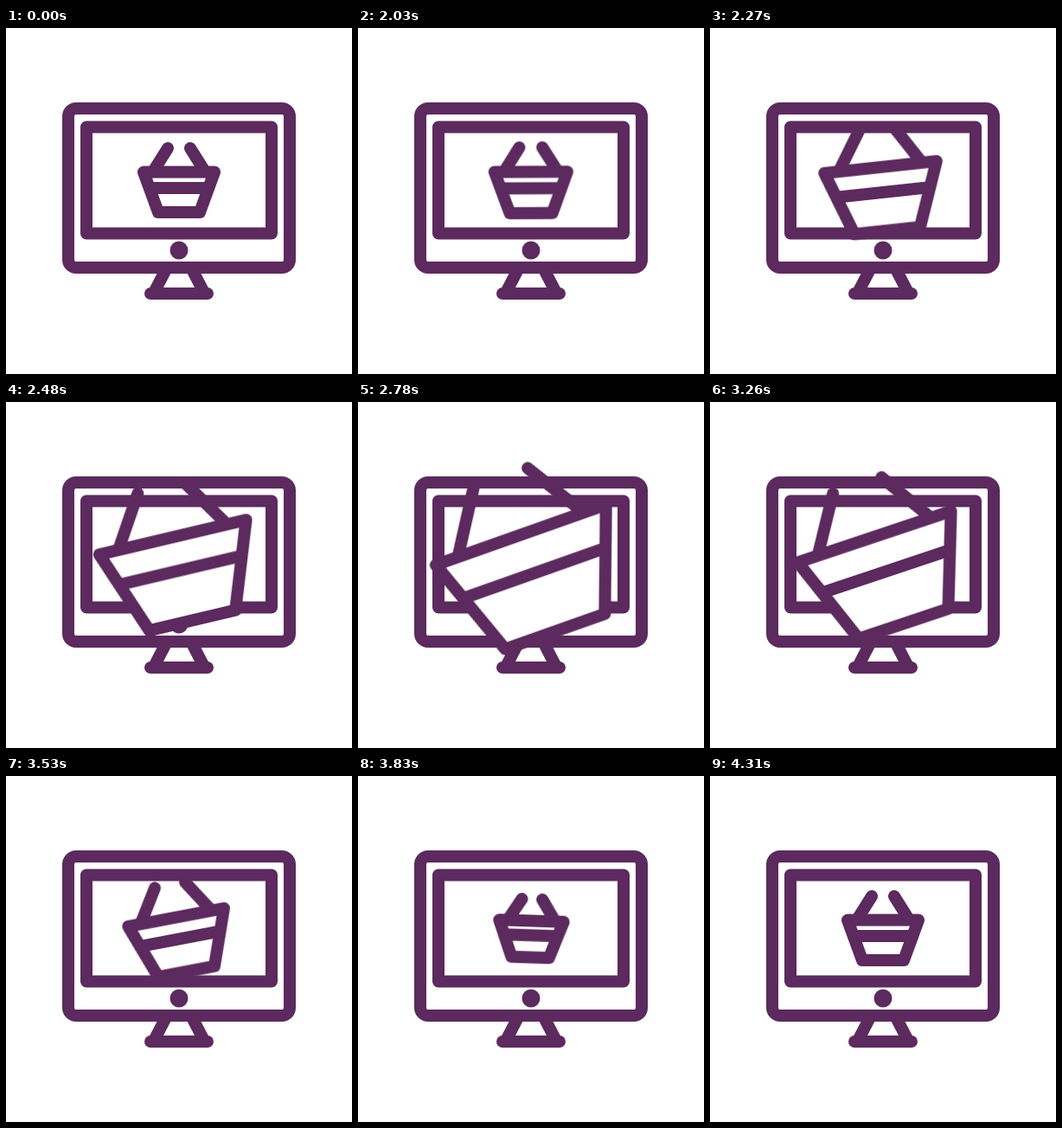
An HTML page that plays this animation: 400x400 px, repeating every 4370 ms.

```html
<!DOCTYPE html>
<html lang="en">
<head>
<meta charset="utf-8">
<title>Online shopping icon</title>
<style>
  html, body {
    margin: 0;
    width: 100%;
    height: 100%;
    overflow: hidden;
    background: #fff;
  }
  svg {
    display: block;
    width: 100%;
    height: 100%;
    --ink: #5c2a5e;
  }
  .line {
    fill: none;
    stroke: var(--ink);
    stroke-width: 14;
    stroke-linecap: round;
    stroke-linejoin: round;
  }
  .turn, .zoom { transform-origin: 202px 177px; }
  .turn { animation: turn 4370ms infinite; }
  .zoom { animation: zoom 4370ms infinite; }
  .zoom path { vector-effect: non-scaling-stroke; }
  .body { fill: #fff; }

  @keyframes zoom {
    0% { transform: scale(1); }
    45.995% { transform: scale(1); animation-timing-function: cubic-bezier(.25, .15, .55, 1); }
    65.675% { transform: scale(2.57); }
    66.362% { transform: scale(2.57); animation-timing-function: cubic-bezier(.7, 0, .7, 1); }
    85.584% { transform: scale(.9); animation-timing-function: cubic-bezier(.33, 0, .67, 1); }
    98.627%, 100% { transform: scale(1); }
  }
  @keyframes turn {
    0% { transform: rotate(0deg); }
    45.995% { transform: rotate(0deg); animation-timing-function: cubic-bezier(.33, .15, .55, 1); }
    66.362% { transform: rotate(-20deg); }
    69.108% { transform: rotate(-20deg); animation-timing-function: cubic-bezier(.7, 0, .7, 1); }
    88.33% { transform: rotate(2deg); animation-timing-function: cubic-bezier(.33, 0, .67, 1); }
    98.627%, 100% { transform: rotate(0deg); }
  }
</style>
</head>
<body>
<svg viewBox="0 0 400 400">
  <g class="line">
    <path d="M185 279 172 304M215 279 228 304M167 307H233"/>
    <rect x="72" y="93" width="256" height="184" rx="9"/>
    <rect x="93" y="114.5" width="214" height="123"/>
  </g>
  <circle cx="200" cy="257" r="10.5" fill="var(--ink)"/>
  <g class="turn">
    <g class="zoom line">
      <path class="body" d="M159 166.5H241L224 213H176Z"/>
      <path d="M166 185H234"/>
      <path d="M187 139 170 166M213 139 230 166"/>
    </g>
  </g>
</svg>
</body>
</html>
```
